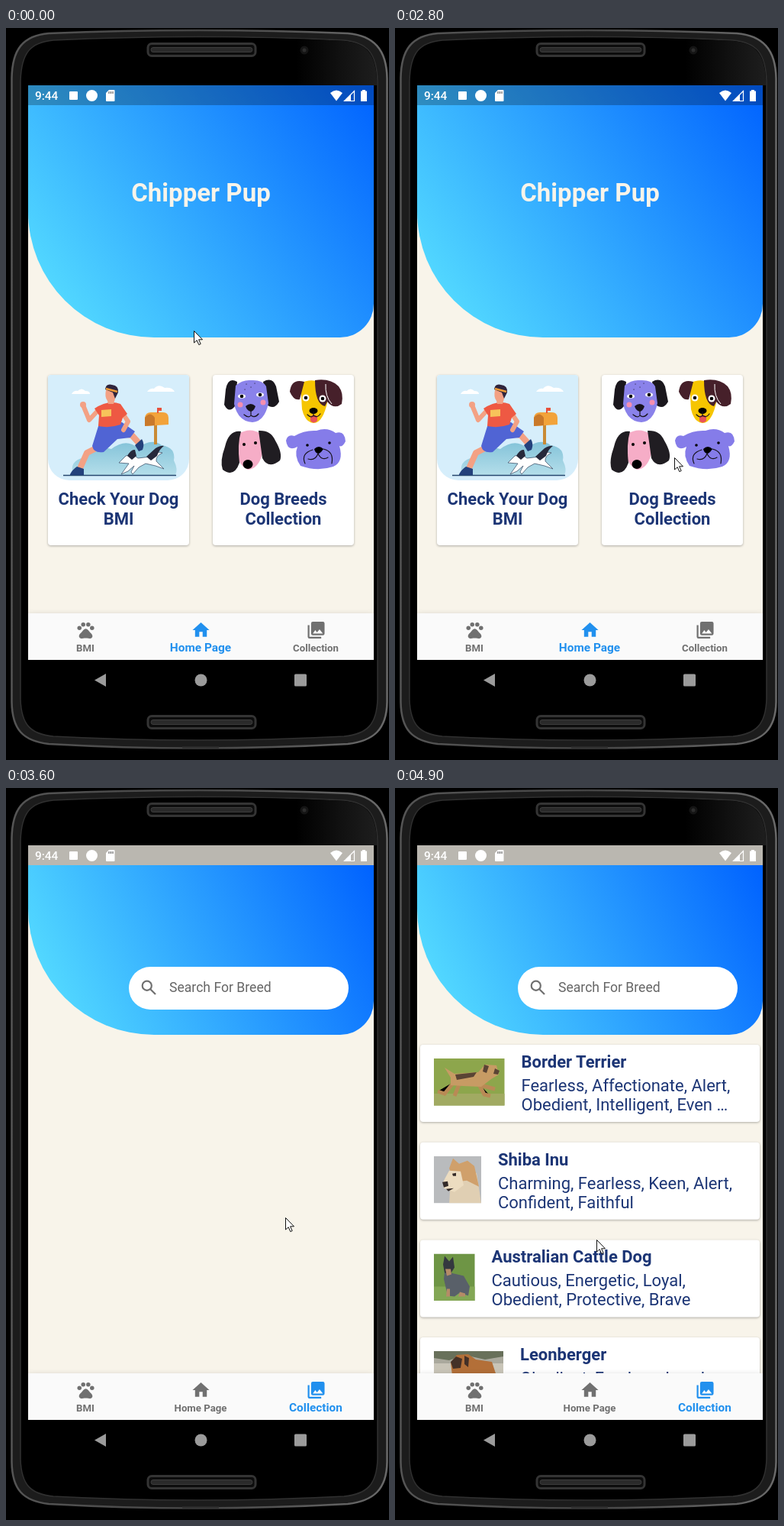
These frames come from a looping animation (502 px wide and 958 px high, 5000 ms). An HTML page:

```html
<!DOCTYPE html>
<html lang="en">
<head>
<meta charset="utf-8">
<title>Dog app demo</title>
<style>
html, body { margin: 0; width: 100%; height: 100%; overflow: hidden; background: #000; }
svg { display: block; font-family: Roboto, sans-serif; }
.bold { font-weight: 700; }
.mid { text-anchor: middle; }
.card { fill: #fff; filter: drop-shadow(0 1.5px 1.5px rgba(0,0,0,.3)); }
.bar { fill: #fafafa; filter: drop-shadow(0 4px 5px rgba(0,0,0,.3)); }
.ink { fill: none; stroke: #17131c; stroke-width: 1.2; stroke-linecap: round; }
.limb { fill: none; stroke: #f3a184; stroke-linejoin: round; stroke-linecap: round; }
</style>
</head>
<body>
<svg id="stage" width="502" height="958" viewBox="0 0 502 958"></svg>
<script>
const CREAM = '#f8f4ea', NAVY = '#1c3575';

const ICONS = {
  BMI: `<circle cx="4.5" cy="9.5" r="2.5"/><circle cx="9" cy="5.5" r="2.5"/><circle cx="15" cy="5.5" r="2.5"/><circle cx="19.5" cy="9.5" r="2.5"/>
    <path d="M17.3 14.9L14.9 12Q13.5 10.5 12 10.5T9.1 12L6.7 14.9C5.3 16.2 3.7 17.6 4 19.7Q4.6 21.7 6.4 22C7.5 22.1 9.5 21.5 12 21.5S16.5 22.1 17.6 22Q19.4 21.7 20 19.7C20.3 17.6 18.6 16.2 17.3 14.9Z"/>`,
  'Home Page': '<path d="M10 20v-6h4v6h5v-8h3L12 3 2 12h3v8z"/>',
  Collection: '<path d="M22 16V4a2 2 0 0 0-2-2H8a2 2 0 0 0-2 2v12a2 2 0 0 0 2 2h12a2 2 0 0 0 2-2zM11 12l2 2.7L16 11l4 5H8zM2 6v14a2 2 0 0 0 2 2h14v-2H4V6z"/>'
};

const icon = (x, y, body) => `<g transform="translate(${x - 13.2} ${y - 13.2}) scale(1.102)">${body}</g>`;

const navBar = active => '<rect class="bar" x="29" y="766" width="453" height="61"/>' +
  Object.keys(ICONS).map((name, i) => {
    const x = 104 + i * 151, on = name === active;
    return `<g fill="${on ? '#2190ee' : '#707070'}">${icon(x + .5, 788, ICONS[name])}
      <text class="bold mid" x="${x}" y="815.5" font-size="${on ? 15.4 : 13.2}">${name}</text></g>`;
  }).join('');

// Header with two rounded lower corners and a corner-to-corner gradient
const header = (id, top, bottom) => `
  <linearGradient id="${id}" gradientUnits="userSpaceOnUse" x1="29" y1="${bottom}" x2="482" y2="${top}">
    <stop stop-color="#5ce6ff"/><stop offset="1" stop-color="#0062ff"/></linearGradient>
  <path fill="url(#${id})" d="M29 ${top}H482V${bottom - 44}a44 44 0 0 1-44 44H194a165 165 0 0 1-165-165Z"/>`;

const page = '<rect x="29" y="75" width="453" height="752" fill="' + CREAM + '"/>';

const homeCard = (x, art, line1, line2) => `
  <rect class="card" x="${x}" y="454" width="185" height="223" rx="4"/>${art}
  <g class="bold mid" font-size="22" fill="${NAVY}">
    <text x="${x + 92.5}" y="624">${line1}</text><text x="${x + 92.5}" y="649.5">${line2}</text></g>`;

const runner = `
  <linearGradient id="bush" x2="0" y2="1"><stop stop-color="#84c3d9"/><stop offset="1" stop-color="#b4deea"/></linearGradient>
  <path fill="#d6eefb" d="M59 454H236a4 4 0 0 1 4 4V564a28 28 0 0 1-28 28H83a28 28 0 0 1-28-28V458a4 4 0 0 1 4-4Z"/>
  <path fill="#fff" d="M86 479q3-5 8-4q5-5 10 0q6 0 6 4ZM185 476q4-5 9-4q6-7 14-1q10-1 13 5Z"/>
  <path fill="url(#bush)" d="M88 585Q82 566 103 562Q114 544 138 551Q158 536 173 550Q190 536 204 546Q223 549 220 566Q226 578 222 585Z"/>
  <path stroke="#27476f" stroke-width="1.4" d="M75 585.5H223"/>
  <path stroke="#c98a35" stroke-width="4" d="M196 519V545"/>
  <path fill="#f2a33a" d="M182 521V510q1-7 8-7h16q7 0 7 8v8Z"/>
  <path fill="#c9792a" d="M182 521V510q7-9 13 0v10Z"/>
  <path fill="#e8503c" d="M198 504v-7h6v4h-4v3Z"/>
  <path class="limb" stroke-width="8" d="M152 531L165 533L174 543"/>
  <path fill="#24417c" d="M169 546l9-8q4 6 1 14l-5 2Z"/>
  <path class="limb" stroke-width="8" d="M122 548L106 556L98 574"/>
  <path fill="#24417c" d="M84 584q3-6 9-10l9 3v8H84Z"/>
  <path fill="#5064d4" d="M122 518L152 516L169 528L163 536L146 538L128 555Q115 557 113 547Z"/>
  <path class="limb" stroke-width="6" d="M121 500L109 513L102 496"/><circle cx="101" cy="493" r="4" fill="#f3a184"/>
  <path class="limb" stroke-width="6" d="M154 506L160 515L154 526"/>
  <path fill="#ee5943" d="M116 498Q134 486 150 492L159 505L153 510L150 519Q136 524 121 521L122 507Z"/>
  <path fill="#f7c35a" d="M125 500l13-1v9l-13 1Z"/>
  <path fill="#f3a184" d="M131 474h12v11l-2 7h-7l-1-4q-4-5-2-14Z"/>
  <path fill="#30253d" d="M130 473Q131 465 139 467Q148 468 147 477L143 485L140 477Z"/>
  <path stroke="#ef9a36" stroke-width="2.5" d="M131 472L146 476"/>
  <path fill="#fff" stroke="#31445d" stroke-width=".7" d="M148 569L157 560L166 558L173 563L190 561Q197 553 205 556Q196 560 197 567L207 577L196 573L183 570L174 575L166 584L164 581L168 573L160 580L151 584L161 570Z"/>
  <path fill="#27293b" d="M159 560Q164 551 169 552L171 560L165 565ZM184 561L196 550Q203 546 207 547Q201 551 198 560L190 566Z"/>`;

const dogs = `
  <path fill="#1a171d" d="M303 463Q291 456 288 473L286 493Q292 505 300 495ZM337 463Q349 456 354 469L358 489Q352 500 343 494Z"/>
  <path fill="#8a82ea" d="M301 468Q310 460 321 461Q336 460 341 469L344 491Q339 515 323 516Q304 515 299 492Z"/>
  <circle cx="307" cy="493" r="3.5" fill="#f58fb0"/><circle cx="337" cy="490" r="3.5" fill="#f58fb0"/>
  <ellipse cx="309" cy="482" rx="5" ry="2.8" fill="#fff"/><ellipse cx="333" cy="480" rx="5" ry="2.8" fill="#fff"/>
  <circle cx="309" cy="482" r="2.3"/><circle cx="333" cy="480" r="2.3"/>
  <path fill="#17131c" d="M314 495q7-6 13 0q-2 6-6 7q-5-1-7-7"/>
  <path class="ink" d="M321 501V507M312 506Q318 511 321 507Q326 511 331 505M315 466h.1M321 470h.1M326 465h.1M313 473h.1"/>

  <path fill="#f6c500" d="M386 465Q399 458 414 464L422 486Q416 517 403 517Q392 516 388 499Z"/>
  <path fill="#46202a" d="M391 463Q374 458 372 476Q377 488 385 486ZM405 461Q425 458 436 469Q443 478 440 492Q430 500 421 489L418 495Q405 492 405 461Z"/>
  <circle cx="393" cy="484" r="4.5" fill="#fff"/><circle cx="415" cy="485" r="4.5" fill="#fff"/>
  <circle cx="393" cy="484" r="2.3"/><circle cx="415" cy="485" r="2.3"/>
  <path fill="#e95458" d="M399 508q5-3 9 0v6q-5 5-9 0Z"/><ellipse cx="403" cy="501" rx="5.5" ry="4"/>
  <path class="ink" d="M403 502V508M395 506Q400 511 403 507Q408 511 412 505"/>
  <path fill="none" stroke="#fff" d="M419 466Q418 482 427 492"/>

  <path fill="#f6adc7" d="M305 531Q320 522 334 531L336 557Q331 577 317 578Q305 573 302 555Z"/>
  <path fill="#201d22" d="M308 528Q292 526 287 548Q280 567 284 578Q299 589 306 569Q303 545 308 528ZM331 527Q347 526 353 540Q363 557 359 566Q344 578 336 563Q333 541 331 527Z"/>
  <circle cx="312" cy="545" r="2"/><circle cx="327" cy="543" r="2"/>
  <ellipse cx="317" cy="571" rx="6.5" ry="6"/>

  <path fill="#857ce9" d="M378 534Q391 526 407 527Q421 522 432 530Q444 526 445 541Q441 549 437 547Q443 568 429 574Q408 581 386 573Q377 560 382 548Q369 555 367 540Q369 531 378 534Z"/>
  <circle cx="395" cy="546" r="1.8"/><circle cx="424" cy="543" r="1.8"/>
  <path d="M404 551q6-6 12 0q-4 6-7 6q-4-1-5-6"/>
  <path class="ink" d="M392 570Q386 557 402 552M409 557Q405 567 396 564M409 557Q414 567 422 562M416 551Q430 554 427 570"/>`;

const home = page + header('gradHome', 75, 405) +
  `<text class="bold mid" x="255.5" y="227" font-size="33" fill="${CREAM}">Chipper Pup</text>` +
  homeCard(55, runner, 'Check Your Dog', 'BMI') +
  homeCard(271, dogs, 'Dog Breeds', 'Collection') + navBar('Home Page');

// name, description lines, photo width, photo drawing
const breeds = [
  ['Border Terrier', 'Fearless, Affectionate, Alert,', 'Obedient, Intelligent, Even …', 92.5, `
    <path fill="#8da64c" d="M0 0H93V62H0Z"/><path fill="#a1aa62" d="M0 46H93V62H0Z"/>
    <path stroke="#b98a55" stroke-width="5" d="M27 30L14 46L5 43M33 34L27 49M58 32L66 47L74 49M54 33L80 40"/>
    <path fill="#c79b64" d="M22 25L14 12L27 20L58 18L67 8L82 9L85 21L75 27L62 37L38 36L22 35Z"/>
    <path fill="#5a4434" d="M66 8l6 2-3 9-5-2ZM80 13l6 3-2 5-6-1ZM28 21l28-3-4 6-22 4Z"/>`],
  ['Shiba Inu', 'Charming, Fearless, Keen, Alert,', 'Confident, Faithful', 62, `
    <path fill="#b9bbbd" d="M0 0H62V62H0Z"/><path fill="#e0cfb3" d="M22 30L56 22L62 62H20Z"/>
    <path fill="#d0a06b" d="M20 16L25 3L33 10L44 6L53 13L59 40L43 32L27 34Z"/>
    <path fill="#ecdcc0" d="M20 19L35 20L39 38L27 47L13 42L12 34Z"/>
    <path fill="#332a28" d="M11 34l7-1 1 6-6 2ZM24 23l5-1v4h-4ZM16 43l10-1-7 4Z"/>`],
  ['Australian Cattle Dog', 'Cautious, Energetic, Loyal,', 'Obedient, Protective, Brave', 53.5, `
    <path fill="#6e9545" d="M0 0H54V62H0Z"/><path fill="#83a755" d="M0 43H54V62H0Z"/>
    <path fill="#596069" d="M15 14L22 25L39 29L47 43L45 55L34 51L27 56L18 55L13 33Z"/>
    <path fill="#34383f" d="M12 14L14 3L20 10L25 4L27 18L22 26L14 25Z"/>
    <path fill="#b58b67" d="M15 20l7 0 1 7-6 2ZM17 46l4 0v10h-5ZM34 50l7 2v4h-9Z"/>`],
  ['Leonberger', 'Obedient, Fearless, Loyal,', 'Loving, Companionable', 91, `
    <path fill="#aaa99d" d="M0 0H91V62H0Z"/><path fill="#c9c5b8" d="M0 16H91V62H0Z"/>
    <path fill="#68705a" d="M0 0H91V7L67 11L40 5L20 12L0 9Z"/>
    <path fill="#b36f38" d="M22 15L30 5L45 4L55 11L76 14L82 32L72 55H60L57 39L39 41L35 57H27Z"/>
    <path fill="#443027" d="M22 14L29 7L37 10L35 22L25 23ZM40 6l6 3-1 12-5-4Z"/>`]
];

const breedCard = ([name, line1, line2, w, art], i) => {
  const y = 336 + i * 127.7;
  return `<rect class="card" x="33" y="${y}" width="445" height="101" rx="4"/>
    <svg class="photo" x="51" y="${y + 18}" width="${w}" height="61.5">${art}</svg>
    <g class="info" data-shift="${w - 44}" font-size="22" fill="${NAVY}">
      <text class="bold" x="117" y="${y + 30}">${name}</text>
      <text x="117" y="${y + 61}">${line1}</text><text x="117" y="${y + 86}">${line2}</text></g>`;
};

const collection = page + header('gradList', 101, 323) + `
  <rect x="161" y="234" width="288" height="56" rx="28" fill="#fff"/>
  ${icon(187.5, 261.5, '<path fill="none" stroke="#707070" stroke-width="2" d="M4 9.5a5.5 5.5 0 1 0 11 0a5.5 5.5 0 1 0-11 0M13.5 13.5L19.7 19.7"/>')}
  <text x="214" y="267" font-size="17.6" fill="#666">Search For Breed</text>
  <g id="list">${breeds.map(breedCard).join('')}</g>` + navBar('Collection');

const speaker = y => `<rect x="186" y="${y}" width="141" height="16" rx="5" fill="#0c0c0c" stroke="#343434" stroke-width="3"/>
  <rect x="190" y="${y + 5}" width="133" height="6" rx="3" fill="#2a2a2a" stroke="#3c3c3c"/>`;

const phone = `
  <linearGradient id="rim" x2="1" y2="0"><stop stop-color="#555"/><stop offset=".5" stop-color="#444"/><stop offset="1" stop-color="#6a6a6a"/></linearGradient>
  <linearGradient id="gloss" x1=".55" y1="0" x2="1" y2="0"><stop/><stop offset="1" stop-color="#1e1e1e"/></linearGradient>
  <path fill="#1c1c1c" stroke="url(#rim)" stroke-width="2.5" d="M7.5 150V66C8 28 22 10 56 7Q250-1 448 7C482 10 499 28 499.5 66V882C499 918 482 933 448 937Q250 948 56 937C22 933 8 918 7.5 882Z"/>
  <path stroke="#333" stroke-width="3" d="M231 942H279"/>
  <path stroke="#303030" stroke-width="1.5" d="M19 150V70C20 32 32 19 62 16Q250 7 443 16C473 19 486 32 487 70V878C486 912 473 924 443 927Q250 937 62 927C32 924 20 912 19 878Z"/>
  <path fill="url(#gloss)" d="M250 13Q350 12 443 17C472 20 485 33 486 70V75H250Z"/>
  ${speaker(20.5)}${speaker(900.5)}
  <circle cx="391" cy="29" r="5.5" fill="#151515"/><circle cx="391" cy="29" r="2.5" fill="#2d2d2d"/>
  <g fill="#9b9b9b"><path d="M116 853.5L131 845V862Z"/><circle cx="255.5" cy="853.5" r="8"/>
    <rect x="378" y="845.5" width="16" height="16" rx="1.5"/></g>`;

const status = `
  <rect x="29" y="75" width="453" height="26" fill-opacity=".25"/>
  <g fill="#fff"><text x="38" y="94" font-size="15.4" font-weight="500">9:44</text>
    <rect x="83" y="83" width="11" height="11" rx="1"/><circle cx="112.5" cy="88.5" r="7.5"/>
    <path d="M135 81H141.5a1 1 0 0 1 1 1V95a1 1 0 0 1-1 1H132a1 1 0 0 1-1-1V85Z"/>
    <path d="M425 85Q433 78 441 85L433 95.5Z"/>
    <path d="M443.5 95.5L456.5 82.5V95.5Z" fill="none" stroke="#fff" stroke-width="1.2"/><path d="M443 96L452 87V96Z"/>
    <path d="M467 81H471V82.5H473V96H465V82.5H467Z"/></g>
  <path stroke="#666" stroke-width="1.2" d="M135 83v3M137.5 83v3M140 83v3"/>`;

const $ = id => document.getElementById(id);
$('stage').innerHTML = `
  <clipPath id="screen"><path d="M29 75H482V827H29Z"/></clipPath>${phone}
  <g clip-path="url(#screen)"><g>${home}</g><g id="next">${collection}</g>${status}</g>
  <path id="cursor" fill="#fff" stroke="#111" d="M.5.5V16L4.2 12.7L6.8 18.6L9.2 17.5L6.6 11.8H11.5Z"/>`;

// Pointer path: time, x, y
const track = [[0, 246, 396], [600, 346, 570], [1200, 346, 570], [1800, 194, 597], [2000, 242, 600],
  [2200, 270, 603], [2800, 366, 562], [3700, 366, 562], [4000, 359, 557], [4900, 264, 591]];

function pointer(t) {
  const i = Math.max(1, track.findIndex(k => k[0] >= t));
  const [t0, x0, y0] = track[i - 1], [t1, x1, y1] = track[i];
  const k = (t - t0) / (t1 - t0);
  return `translate(${x0 + (x1 - x0) * k} ${y0 + (y1 - y0) * k})`;
}

const show = (el, on) => { el.style.display = on ? '' : 'none'; };

function draw(ms) {
  const t = Math.floor(ms % 5000 / 100) * 100; // ten pictures a second
  const zoom = Math.min(1, Math.max(0, (t - 3200) / 300));
  const loaded = t >= 4900;
  show($('next'), zoom > 0);
  $('next').setAttribute('transform', `translate(255.5 451) scale(${zoom}) translate(-255.5 -451)`);
  show($('list'), t >= 3700);
  document.querySelectorAll('.photo').forEach(el => show(el, loaded));
  document.querySelectorAll('.info').forEach(el =>
    el.setAttribute('transform', `translate(${loaded ? el.dataset.shift : 0} 0)`));
  $('cursor').setAttribute('transform', pointer(t));
}

const start = performance.now();
function tick(now) {
  draw(Math.max(0, now - start));
  requestAnimationFrame(tick);
}
draw(0);
requestAnimationFrame(tick);
</script>
</body>
</html>
```
